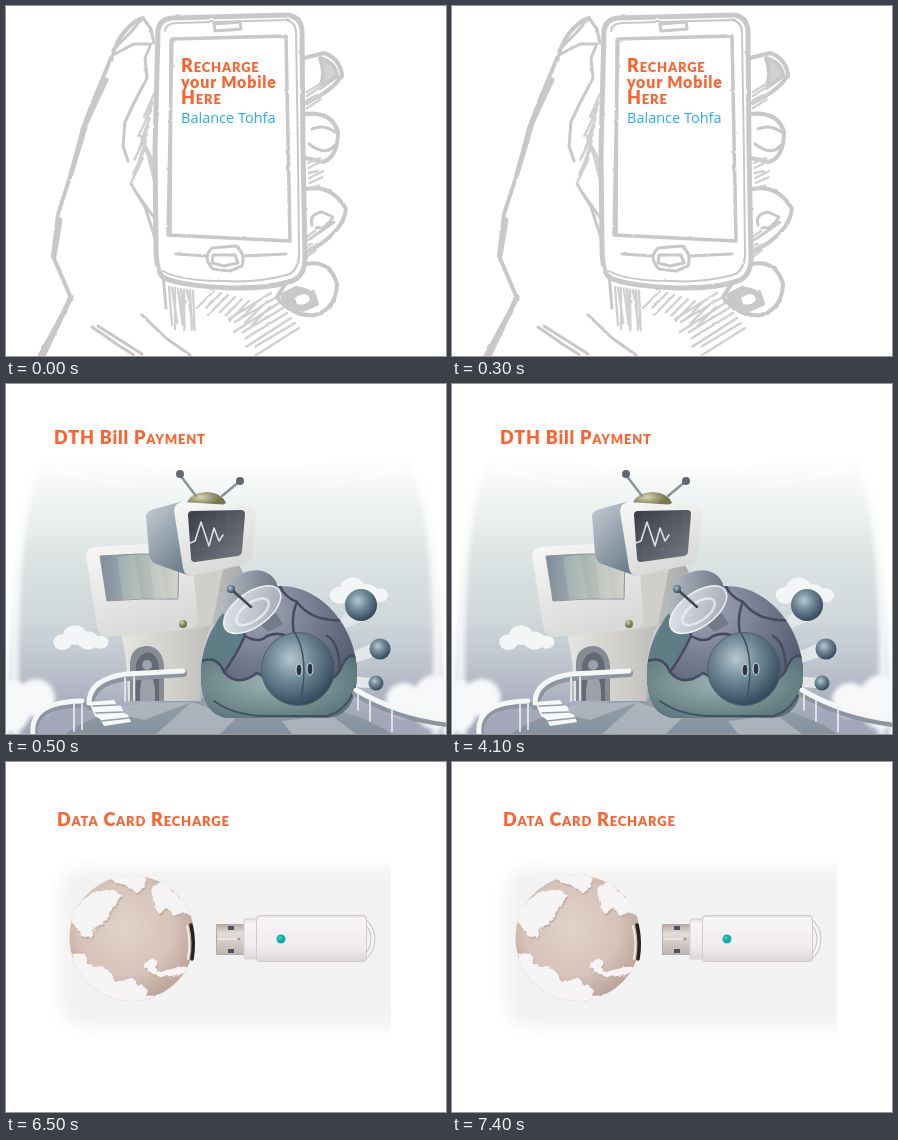
Recreate the animation shown at these times as an HTML page. Size 440 by 350 pixels, loop 8000 ms.

```html
<!DOCTYPE html>
<html lang="en">
<head>
<meta charset="utf-8">
<title>Recharge banner</title>
<style>
  html, body { margin: 0; width: 100%; height: 100%; overflow: hidden; background: #fff; }
  svg { display: block; width: 440px; height: 350px; }
  .title { font: 900 18px Lato, sans-serif; fill: #fb6431; letter-spacing: .8px; }
  .caps { font-variant-caps: small-caps; }
  .line { fill: none; stroke-linecap: round; stroke-linejoin: round; }
  .pencil { stroke: #c8c8c8; stroke-width: 4; }
  .paper { fill: #fff; }
  .seam { stroke: #454b5f; stroke-width: 2.5; }
</style>
</head>
<body>
<svg viewBox="0 0 440 350">
  <defs>
    <filter id="rough" x="0" y="0" width="440" height="350" filterUnits="userSpaceOnUse">
      <feTurbulence type="fractalNoise" baseFrequency=".09" numOctaves="2" seed="4"/>
      <feDisplacementMap in="SourceGraphic" scale="2" xChannelSelector="R" yChannelSelector="G"/>
      <feGaussianBlur stdDeviation=".4"/>
    </filter>
    <filter id="jag" x="-10%" y="-10%" width="120%" height="120%">
      <feTurbulence type="fractalNoise" baseFrequency=".14" numOctaves="2" seed="9"/>
      <feDisplacementMap in="SourceGraphic" scale="6" xChannelSelector="R" yChannelSelector="G"/>
    </filter>
    <filter id="soft" x="-30%" y="-30%" width="160%" height="160%"><feGaussianBlur stdDeviation="8"/></filter>
    <filter id="haze" x="-30%" y="-30%" width="160%" height="160%"><feGaussianBlur stdDeviation="2"/></filter>

    <linearGradient id="sky" x2="0" y2="1">
      <stop offset="0" stop-color="#fff"/>
      <stop offset=".15" stop-color="#f1f4f4"/>
      <stop offset=".36" stop-color="#dce3e3"/>
      <stop offset=".58" stop-color="#cfd7da"/>
      <stop offset=".74" stop-color="#bec4ce"/>
      <stop offset=".92" stop-color="#a2a7b9"/>
    </linearGradient>
    <linearGradient id="tower">
      <stop offset="0" stop-color="#e6e6e2"/>
      <stop offset=".5" stop-color="#cdccc7"/>
      <stop offset="1" stop-color="#a8aaaa"/>
    </linearGradient>
    <linearGradient id="shell" x2=".4" y2="1">
      <stop offset="0" stop-color="#f8f8f7"/>
      <stop offset="1" stop-color="#d9dad7"/>
    </linearGradient>
    <linearGradient id="glass">
      <stop offset="0" stop-color="#7d8c9c"/>
      <stop offset=".45" stop-color="#a6b3b2"/>
      <stop offset="1" stop-color="#d4d4c9"/>
    </linearGradient>
    <linearGradient id="side" x2=".6" y2="1">
      <stop offset="0" stop-color="#c5ced5"/>
      <stop offset="1" stop-color="#71808f"/>
    </linearGradient>
    <linearGradient id="tube" x2="1" y2="1">
      <stop offset="0" stop-color="#373c48"/>
      <stop offset="1" stop-color="#767b85"/>
    </linearGradient>
    <linearGradient id="dish" x2="1" y2=".6">
      <stop offset="0" stop-color="#e6e9ed"/>
      <stop offset="1" stop-color="#a9b0bc"/>
    </linearGradient>
    <linearGradient id="bowl" x2="1" y2=".6">
      <stop offset="0" stop-color="#c3c8cf"/>
      <stop offset="1" stop-color="#6f7888"/>
    </linearGradient>
    <radialGradient id="dome" cx=".4" cy=".25" r=".75">
      <stop offset="0" stop-color="#a0a5b5"/>
      <stop offset=".5" stop-color="#6f768a"/>
      <stop offset="1" stop-color="#4a5166"/>
    </radialGradient>
    <radialGradient id="moss" cx=".45" cy=".4" r=".7">
      <stop offset="0" stop-color="#9bb2b0"/>
      <stop offset="1" stop-color="#4f6b73"/>
    </radialGradient>
    <radialGradient id="ball" cx=".4" cy=".36" r=".65">
      <stop offset="0" stop-color="#b6c8cf"/>
      <stop offset=".45" stop-color="#708a98"/>
      <stop offset="1" stop-color="#34495b"/>
    </radialGradient>
    <radialGradient id="gold" cx=".35" cy=".3">
      <stop offset="0" stop-color="#d6d3b2"/>
      <stop offset="1" stop-color="#77764f"/>
    </radialGradient>
    <linearGradient id="floor" x2="0" y2="1">
      <stop offset="0" stop-color="#95a0aa"/>
      <stop offset="1" stop-color="#5f6d7b"/>
    </linearGradient>

    <radialGradient id="ocean" cx=".45" cy=".42" r=".58">
      <stop offset="0" stop-color="#e2d3ca"/>
      <stop offset=".65" stop-color="#d6c3b9"/>
      <stop offset="1" stop-color="#bda69b"/>
    </radialGradient>
    <linearGradient id="stick" x2="0" y2="1">
      <stop offset="0" stop-color="#e2dcdd"/>
      <stop offset=".12" stop-color="#f8f5f6"/>
      <stop offset=".7" stop-color="#f0ebec"/>
      <stop offset="1" stop-color="#dcd5d6"/>
    </linearGradient>
    <linearGradient id="metal" x2="0" y2="1">
      <stop offset="0" stop-color="#b5aca8"/>
      <stop offset=".3" stop-color="#e4dcd8"/>
      <stop offset="1" stop-color="#bfb5b0"/>
    </linearGradient>
    <clipPath id="world"><circle cx="126" cy="176" r="63"/></clipPath>
    <clipPath id="back"><path d="M195 291C195 245 226 203 274 202C318 202 351 246 351 290Q350 334 318 334H222Q195 331 195 291Z"/></clipPath>
  </defs>
  <rect width="440" height="350" fill="#fff"/>

  <g id="mobile">
    <g class="line pencil" filter="url(#rough)">
      <path d="M137 12Q122 17 111 37L101 62L86 98L77 122L65 168L52 208L47 250L65 292L34 349"/>
      <path d="M107 44L124 27L137 12L145 23L148 38M109 48L128 38L145 38L139 52L141 72L128 97L119 116L117 140L122 155" stroke-width="3"/>
      <path d="M77 124Q84 108 100 74M65 168L79 121M48 250L54 214M65 291L38 348" stroke-width="5"/>
      <path d="M125 178L139 201L149 232L157 268L160 302M130 186L149 213" stroke-width="3"/>
      <path d="M86 321L112 339L128 349M92 320L136 348M136 309L160 332L184 349" stroke-width="3"/>
      <path class="paper" d="M298 52L318 47Q333 52 336 68Q330 83 300 97M299 108Q326 105 332 126Q332 151 317 156L299 152M300 183Q326 178 340 203Q337 228 299 247"/>
      <path d="M314 52Q330 57 331 70L314 82Q320 68 314 52Z" fill="#d2d2d2"/>
      <path d="M306 123Q318 118 329 126M303 138Q320 151 329 139" stroke-width="3"/>
      <path d="M306 219Q303 208 316 206L327 211Q321 222 310 222M301 235L328 216" stroke-width="3"/>
      <path id="shade" stroke="#d0d0d0" stroke-width="2.400"/>
      <path class="paper" d="M271 291Q284 269 299 258Q324 253 331 278Q330 303 309 309Q286 311 271 291Z"/>
      <path d="M276 289L290 282L307 286L311 298L297 304Q281 303 276 289Z" fill="#c8c8c8"/>
      <path d="M289 292Q302 283 304 294Q299 300 291 298Z" fill="#fff" stroke="none"/>
      <path class="paper" d="M152 24Q154 13 166 12L280 9Q295 10 296 25L297 145L299 252Q299 270 286 275Q261 283 224 282Q177 280 158 272Q150 267 150 240L149 145Z" stroke-width="5"/>
      <path d="M159 25Q160 17 171 17L279 14Q290 15 290 27L292 150L293 251Q291 266 281 269Q250 277 219 275Q174 275 157 265" stroke-width="2"/>
      <path d="M166 33L280 30L284 235L162 229ZM165 34L164 228" stroke-width="3.500"/>
      <path d="M208 18L234 16L235 23L209 25ZM170 248L201 250M237 250L280 248M206 242L230 240Q240 248 236 260L224 265L207 263Q196 252 206 242ZM207 249H229L232 257L218 260L206 257Z" stroke-width="3"/>
    </g>
    <g class="title">
      <text x="175" y="66" class="caps">Recharge</text>
      <text x="175" y="82" style="font-size:16px">your Mobile</text>
      <text x="175" y="98" class="caps">Here</text>
    </g>
    <text x="175" y="117" fill="#22aef3" style="font:14.500px 'Open Sans',sans-serif">Balance Tohfa</text>
  </g>

  <g id="dth">
    <path d="M30 73Q220 90 410 73Q436 150 437 355H3Q4 150 30 73Z" fill="url(#sky)" filter="url(#haze)"/>
    <path class="line" d="M30 76Q70 97 132 101M410 76Q370 97 308 101" stroke="#fff" opacity=".6"/>
    <path class="line" d="M30 80Q3 160 10 350M410 80Q437 160 430 350" stroke="#fff" stroke-width="9" opacity=".75" filter="url(#haze)"/>
    <g id="clouds" fill="#f4f5f6"></g>

    <ellipse cx="222" cy="377" rx="180" ry="64" fill="url(#floor)"/>
    <path d="M100 327L138 319L186 318L138 336ZM186 318L230 334L214 350H150ZM276 337L325 331L350 350H286Z" fill="#b4bdc5" opacity=".75"/>

    <path d="M112 240L181 190L180 158L228 176Q242 188 239 211L204 244Q191 272 195 317H122Q122 270 112 240Z" fill="url(#tower)"/>
    <path d="M80 172Q80 164 89 163L172 158Q184 158 186 169L192 232Q193 243 183 245L103 253Q93 253 91 242Z" fill="url(#shell)"/>
    <path d="M187 166L218 180L206 241L185 246Q193 242 192 232Z" fill="#d0d0cb"/>
    <path d="M94 172Q132 169 173 170L172 215Q136 214 101 217Z" fill="url(#glass)" stroke="#8e969a"/>
    <path d="M111 173L128 171L136 215L117 216ZM143 171H154L160 215H148Z" fill="#e3e5da" opacity=".18"/>
    <circle cx="177" cy="240" r="4" fill="url(#gold)"/>
    <path d="M124 317V279Q125 262 142 262Q157 264 158 283V317Z" fill="#868b94"/>
    <path d="M130 317V281Q133 269 143 268Q152 271 153 284V317Z" fill="#646a75"/>
    <path d="M134 317Q133 293 141 287Q150 293 149 317Z" fill="#9ca1aa"/>
    <circle cx="141" cy="281" r="5" fill="#9ca1aa"/>

    <path d="M181 119Q184 109 201 108Q216 109 220 119L210 125H190Z" fill="url(#gold)"/>
    <path class="line" d="M190 112L174 91M216 112L234 97" stroke="#8d9298" stroke-width="2.500"/>
    <circle cx="174" cy="90" r="4" fill="#626873"/>
    <circle cx="234" cy="97" r="4" fill="#626873"/>
    <path d="M140 131Q141 127 148 125L174 118L184 192L150 180Q144 178 143 170Z" fill="url(#side)"/>
    <path d="M168 127Q168 119 177 118L240 122Q250 123 250 132L246 171Q245 179 236 181L186 192Q179 193 177 184Z" fill="url(#shell)"/>
    <path d="M182 131Q182 127 186 127L235 126Q239 126 239 130L236 167Q236 171 232 172L189 178Q185 178 185 174Z" fill="url(#tube)"/>
    <path class="line" d="M184 159L189 157L195 138L203 162L208 144L213 157L217 151" stroke="#d9e2e3" stroke-width="1.600"/>
    <path class="line" d="M192 130V176M202 130V175M212 130V174M222 129V173M232 129V170M185 141H237M186 153H236M187 165H235" stroke="#939aa4" stroke-width=".5" opacity=".25"/>

    <path d="M332 239L348 218L359 236L340 244ZM346 268L369 258L371 272L349 279ZM344 292L366 294L365 304L344 303Z" fill="#e2e6e8"/>
    <g fill="url(#ball)">
      <circle cx="355" cy="221" r="16"/>
      <circle cx="374" cy="265" r="10.500"/>
      <circle cx="370" cy="299" r="7.500"/>
    </g>
    <g clip-path="url(#back)">
      <rect x="190" y="190" width="165" height="150" fill="url(#dome)"/>
      <path d="M193 278Q211 270 218 288Q231 304 251 289Q277 305 301 295Q323 305 334 286Q342 265 354 275V340H193Z" fill="url(#moss)"/>
      <path d="M193 280L216 228Q235 233 239 252Q229 273 218 288Q211 270 193 278Z" fill="#5f7d84"/>
      <g class="line seam">
        <path d="M193 278Q211 270 218 288Q231 304 251 289Q277 305 301 295Q323 305 334 286Q342 265 354 275"/>
        <path d="M273 200Q278 213 291 218Q306 238 337 236M216 228Q235 233 239 252Q253 260 261 252Q276 246 289 257M291 218Q284 233 289 257M321 252Q333 258 334 286M239 252Q229 273 218 288"/>
      </g>
    </g>
    <path class="line" d="M208 317Q230 333 265 332H321Q342 326 349 303" stroke="#43505f" stroke-width="2"/>
    <path d="M252 238L270 229L277 240L262 248Z" fill="#737a88"/>
    <g transform="rotate(-36 245 224)">
      <ellipse cx="250" cy="214" rx="31" ry="24" fill="url(#bowl)"/>
      <ellipse cx="245" cy="226" rx="33" ry="17" fill="url(#dish)" stroke="#eef0f2" stroke-width="1.500"/>
      <ellipse cx="244" cy="228" rx="19" ry="9" fill="none" stroke="#f3f5f6" stroke-width="2.500" opacity=".7"/>
    </g>
    <path class="line" d="M225 205L245 223" stroke="#414957" stroke-width="2.500"/>
    <circle cx="225" cy="205" r="4" fill="url(#ball)"/>
    <circle cx="292" cy="285" r="36.500" fill="url(#ball)" stroke="#4e6070"/>
    <path class="line" d="M289 249Q304 274 294 320" stroke="#3f5162" stroke-width="1.500"/>
    <g fill="#283848" stroke="#d9e3e8">
      <ellipse cx="293" cy="286" rx="3" ry="6"/>
      <ellipse cx="304" cy="285" rx="3" ry="6"/>
    </g>

    <g fill="#f7f8fa" filter="url(#haze)">
      <ellipse cx="6" cy="322" rx="20" ry="26"/>
      <ellipse cx="30" cy="314" rx="19" ry="19"/>
      <ellipse cx="428" cy="318" rx="22" ry="27"/>
      <ellipse cx="398" cy="316" rx="18" ry="17"/>
    </g>
    <g class="line">
      <path d="M28 352Q24 320 76 320M84 322Q84 298 120 293L177 289M441 339Q391 333 350 309" stroke="#8d95a0" stroke-width="8"/>
      <path d="M27 350Q23 318 76 317M83 319Q83 295 120 290L177 287M441 336Q391 330 350 306" stroke="#f5f6f6" stroke-width="5"/>
      <path d="M68 320V347M76 320V345M119 294V317M128 293V316M352 311V326M364 317V337M386 326V347" stroke="#dfe2e6" stroke-width="2"/>
    </g>
    <path d="M83 318L108 316L111 321L115 322L118 329L122 331L125 338L98 342L94 335L89 332Z" fill="#f7f8f8"/>
    <path class="line" d="M87 322L111 321M90 329L117 328M95 337L123 334" stroke="#969ea9" stroke-width="1.500"/>
    <text x="48" y="60" class="title">DTH Bill <tspan class="caps">Payment</tspan></text>
  </g>

  <g id="data">
    <rect x="54" y="106" width="370" height="159" rx="24" fill="#f3f2f2" filter="url(#soft)"/>
    <rect x="385" y="80" width="55" height="220" fill="#fff"/>
    <circle cx="126" cy="176" r="62.500" fill="url(#ocean)"/>
    <g clip-path="url(#world)">
      <g fill="#c4b0a6" transform="translate(1 2)" filter="url(#jag)"><use href="#land"/></g>
      <g fill="#f6f4f4" filter="url(#jag)">
        <g id="land">
          <path d="M62 156L75 139L89 130L105 127L116 133L108 144L103 153L98 161L90 165L85 176L76 174L70 164Z"/>
          <path d="M103 118L119 109L139 113L140 125L130 130L119 124Z"/>
          <path d="M145 128L154 119L177 137L187 155L176 150L169 155L162 146L153 151L148 142Z"/>
          <path d="M65 191L79 192L85 203L103 208L110 219L128 218L141 227L139 234L158 233L146 243H98L74 226Z"/>
          <path d="M136 205L146 195L152 200L150 207L160 209L172 204L184 207L174 213L156 215L148 212Z"/>
        </g>
      </g>
    </g>
    <path class="line" d="M185 163Q189 180 186 197" stroke="#282321" stroke-width="3.500"/>
    <path class="line" d="M181 164Q185 180 182 197" stroke="#f1e9e5" stroke-width="2"/>

    <path class="line" d="M357 157Q367 166 367 177Q367 189 357 197" stroke="#c9c3c4" stroke-width="5"/>
    <path class="line" d="M357 157Q367 166 367 177Q367 189 357 197" stroke="#f7f4f5" stroke-width="3"/>
    <rect x="210.500" y="162.500" width="30" height="30" fill="url(#metal)" stroke="#b5aca8"/>
    <path d="M222 164H228V168H222ZM222 187H228V191H222Z" fill="#4b5363"/>
    <path class="line" d="M212 177H230" stroke="#f1ece8" stroke-width="1.500"/>
    <circle cx="233" cy="177" r="1.500" fill="#a59a95"/>
    <rect x="238" y="157" width="17" height="40" rx="2" fill="url(#stick)" stroke="#d7d0d1"/>
    <rect x="250.500" y="153.500" width="110" height="46" rx="3" fill="url(#stick)" stroke="#d2cacb"/>
    <path d="M253 156.500H358" stroke="#fff" stroke-width="1.500"/>
    <circle cx="275" cy="177" r="4.500" fill="#13aea9"/>
    <circle cx="274" cy="176" r="1.700" fill="#3fcdc4"/>
    <text x="51" y="64" class="title caps">Data Card Recharge</text>
  </g>
</svg>
<script>
const $ = id => document.getElementById(id);

// Parallel pencil strokes stepping away from a start point
function hatch(count, x, y, stepX, stepY, dx, dy) {
  let d = "";
  for (let i = 0; i < count; i++) {
    const wobble = 3 * Math.sin(i * 2.3);
    d += `M${x + i * stepX} ${y + i * stepY}l${dx + wobble} ${dy - wobble}`;
  }
  return d;
}

$("shade").setAttribute("d",
  hatch(9, 148, 88, -1.4, 8, -10, 23) +
  hatch(7, 135, 130, 2, 4, 13, 38) +
  hatch(9, 163, 281, 3, .5, 3, 38) +
  hatch(9, 208, 285, 7, 2, -17, 17) +
  hatch(8, 265, 287, 4, 5, -42, 26) +
  hatch(6, 302, 157, .4, 5, 12, -5) +
  hatch(5, 301, 86, 0, 4, 13, -8) +
  hatch(5, 299, 232, 0, 5, 10, -7));

function cloud(x, y, size) {
  return [[-25, 4, 12], [-9, -5, 15], [8, 2, 14], [24, 4, 10]].map(([dx, dy, r]) =>
    `<ellipse cx="${x + dx * size}" cy="${y + dy * size}" rx="${r * size}" ry="${r * .85 * size}"/>`).join("");
}
$("clouds").innerHTML = cloud(76, 255, .78) + cloud(354, 208, .82);

const LOOP = 8000;
const scenes = [["mobile", 0], ["dth", 500], ["data", 6500]];

function draw(t) {
  const current = scenes.filter(([, start]) => t >= start).pop()[0];
  for (const [id] of scenes) $(id).style.display = id === current ? "" : "none";
}

const begin = performance.now();
function tick() {
  draw((performance.now() - begin) % LOOP);
  requestAnimationFrame(tick);
}
tick();
</script>
</body>
</html>
```
